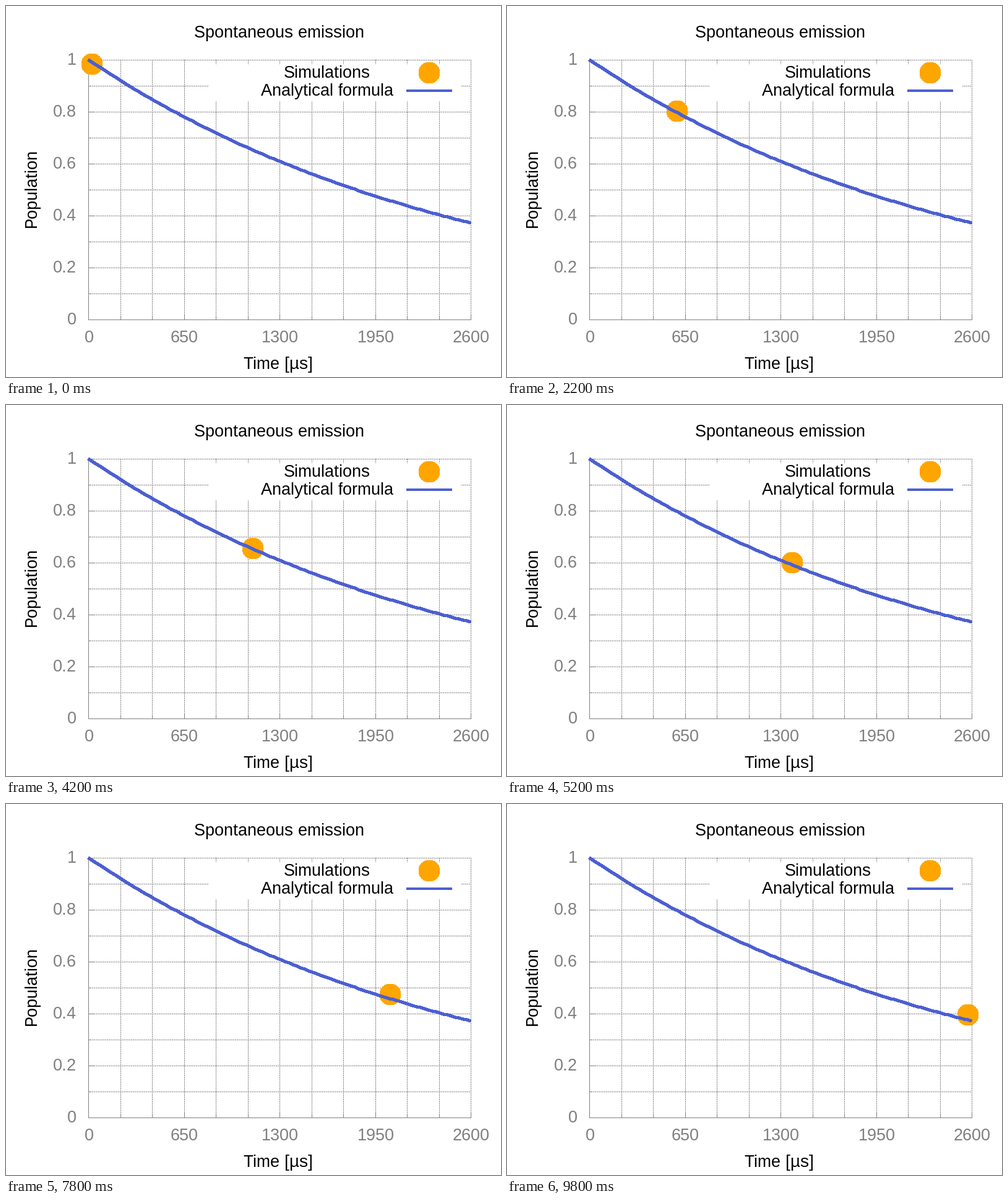
A matplotlib script that plays this animation: 800x600 px, repeating every 9.9 s.

```python
import numpy as np
import matplotlib.pyplot as plt
from matplotlib.animation import FuncAnimation
from matplotlib.patches import Circle, Rectangle

plt.rcParams.update({
    "font.family": "Liberation Sans",
    "text.hinting": "default",
    "text.hinting_factor": 1,
})

W, H = 800, 600
PT = 0.72                      # points per pixel at 100 dpi
FRAMES, INTERVAL = 99, 100
LEFT, RIGHT, TOP, BOTTOM = 133, 751, 87, 507
T_MAX, TAU = 2600, 2625
GRAY, BLUE, ORANGE = "#808080", "#4c5fd2", "#ffa500"
RADIUS = 17
DOTTED = (0, (2, 2))

fig = plt.figure(figsize=(W / 100, H / 100), dpi=100, facecolor="white")
ax = fig.add_axes([0, 0, 1, 1])
ax.set_xlim(0, W)
ax.set_ylim(H, 0)
ax.axis("off")


def line(xs, ys, color=GRAY, width=1.0, z=1, **style):
    ax.plot(xs, ys, color=color, lw=width * PT, zorder=z, snap=False,
            antialiased=False, solid_capstyle="butt", dash_capstyle="butt",
            **style)


def hline(x0, x1, y, **style):
    line([x0, x1 + 1], [y + 0.5, y + 0.5], **style)


def vline(x, y0, y1, **style):
    line([x + 0.5, x + 0.5], [y0, y1 + 1], **style)


def label(x, y, text, color="black", ha="center", rotation=0):
    ax.text(x, y, text, color=color, ha=ha, va="baseline", rotation=rotation,
            rotation_mode="anchor", fontsize=26.67 * PT, zorder=6)


def dot(x, y, z):
    return ax.add_patch(Circle((x, y), RADIUS, fc=ORANGE, lw=0, zorder=z,
                               antialiased=False))


# Grid, ticks and tick labels
for i in range(13):
    x = np.floor(LEFT + 51.5 * i + 0.5)
    vline(x, TOP, BOTTOM, linestyle=DOTTED)
    vline(x, BOTTOM - (4 if i % 3 else 9), BOTTOM)
    if i % 3 == 0:
        label(134 + 51.5 * i, 544.5, f"{T_MAX * i // 12}", GRAY)
for i in range(11):
    y = BOTTOM - 42 * i
    hline(LEFT, RIGHT, y, linestyle=DOTTED)
    hline(LEFT, LEFT + (4 if i % 2 else 9), y)
    if i % 2 == 0:
        label(113.7, y + 8.2, f"{i / 10:g}", GRAY, ha="right")
vline(LEFT, TOP, BOTTOM)
hline(LEFT, RIGHT, BOTTOM)

# Titles
label(441, 51, "Spontaneous emission")
label(440.5, 587, "Time [µs]")
label(49, 295, "Population", rotation=90)

# Legend
ax.add_patch(Rectangle((328, 94), 407, 60, fc="white", lw=0, zorder=2))
label(518.5, 116, "Simulations")
label(518.5, 145, "Analytical formula")
dot(684, 108, 5)
line([647, 721], [137, 137], BLUE, 4, 5)

# Exponential decay, sampled on whole pixels
t = np.linspace(0, T_MAX, 100)
curve_x = np.round(LEFT + (RIGHT - LEFT) * t / T_MAX)
curve_y = np.round(BOTTOM - (BOTTOM - TOP) * np.exp(-t / TAU))
line(curve_x, curve_y, BLUE, 4, 4, solid_joinstyle="round")

# Simulated population: height in pixels at a few steps
STEPS = [0, 10, 12, 20, 30, 33, 40, 50, 52, 60, 65, 70, 78, 80, 90, 98]
HEIGHTS = [94, 129, 138, 163, 197, 203, 227, 252, 255, 270, 275, 283.5,
           308, 311, 328, 341]
marker = dot(139, 94, 3)


def update(n):
    x = LEFT + 6.18 * (n + 1)
    y = np.interp(n, STEPS, HEIGHTS)
    marker.center = (np.round(x), np.round(y))
    return (marker,)


anim = FuncAnimation(fig, update, frames=FRAMES, interval=INTERVAL,
                     repeat=True, repeat_delay=0)
plt.show()
```
